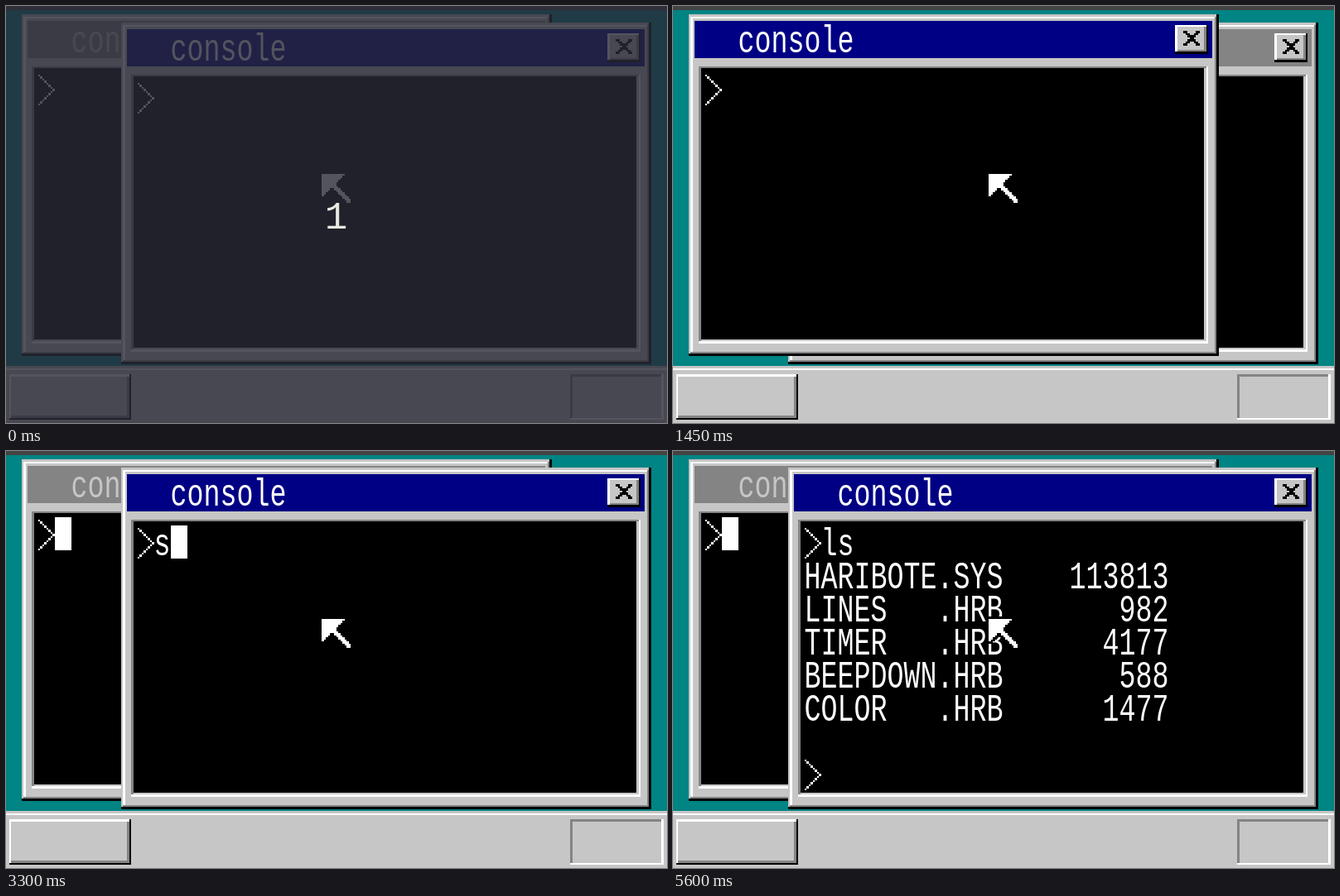
An HTML page for the animation above (5700 ms loop, 798 px wide and 504 px high).

```html
<!DOCTYPE html>
<html lang="en">
<head>
<meta charset="utf-8">
<title>Two consoles</title>
<style>
  html, body { margin: 0; width: 100%; height: 100%; overflow: hidden; background: #444; }
  svg { display: block; width: 798px; height: 504px; }
  rect, path { shape-rendering: crispEdges; }
  text { font-family: "Liberation Mono", "DejaVu Sans Mono", monospace; white-space: pre; }
</style>
</head>
<body>
<svg id="stage" viewBox="0 0 798 504"></svg>
<script>
const LOOP = 5700;
const GREY = '#c6c6c6', DARK = '#848484', WHITE = '#fff', BLACK = '#000';
const TEAL = '#008484', NAVY = '#000084';
const stage = document.getElementById('stage');

const LISTING = [
  ['HARIBOTE.SYS', 113813],
  ['LINES   .HRB', 982],
  ['TIMER   .HRB', 4177],
  ['BEEPDOWN.HRB', 588],
  ['COLOR   .HRB', 1477]
].map(([name, size]) => name + String(size).padStart(10));

// Corners are inclusive, in pixels of the 320 x 200 screen.
const box = (c, x0, y0, x1, y1) =>
  `<rect x="${x0}" y="${y0}" width="${x1 - x0 + 1}" height="${y1 - y0 + 1}" fill="${c}"/>`;

const at = (x, y, body) => `<g transform="translate(${x} ${y})">${body}</g>`;

// Tall 8 x 16 character cells.
const label = (x, y, str, c = WHITE) =>
  `<text transform="translate(${x} ${y + 14.2}) scale(1 1.4)" font-size="13.333" fill="${c}">${str}</text>`;

function prompt(y) {
  let out = '';
  for (let r = 1; r < 16; r++) {
    const x = 7 - Math.abs(r - 8);
    out += box(WHITE, x, y + r, x, y + r);
  }
  return out;
}

const block = (col, row) => box(WHITE, col * 8, row * 16, col * 8 + 7, row * 16 + 15);

function closeButton() {
  let out = box(BLACK, 0, 0, 15, 13) + box(WHITE, 0, 0, 14, 12) +
    box(DARK, 1, 1, 14, 12) + box(WHITE, 1, 0, 14, 0) + box(GREY, 1, 1, 13, 11);
  for (let r = 3; r < 10; r++) {
    const d = Math.abs(r - 6);
    out += box(BLACK, 7 - d, r, 8 - d, r) + box(BLACK, 7 + d, r, 8 + d, r);
  }
  return out;
}

function win(x, y, active, content) {
  return at(x, y,
    box(BLACK, 0, 0, 255, 164) + box(GREY, 0, 0, 254, 163) +
    box(DARK, 1, 1, 254, 163) + box(WHITE, 1, 1, 253, 162) +
    box(GREY, 2, 2, 253, 162) +
    box(active ? NAVY : DARK, 3, 3, 252, 20) +
    label(24, 4, 'console', active ? WHITE : GREY) +
    at(235, 5, closeButton()) +
    box(WHITE, 5, 25, 250, 158) + box(DARK, 5, 25, 249, 157) +
    box(GREY, 6, 26, 249, 157) + box(BLACK, 6, 26, 248, 156) +
    at(8, 28, content));
}

function desktop() {
  return box(TEAL, 0, 0, 319, 171) + box(GREY, 0, 172, 319, 199) +
    box(WHITE, 0, 173, 319, 173) +
    box(BLACK, 2, 176, 60, 197) + box(WHITE, 2, 176, 59, 196) +
    box(DARK, 3, 177, 59, 196) + box(GREY, 3, 177, 58, 195) +
    box(WHITE, 273, 176, 317, 197) + box(DARK, 273, 176, 316, 196) +
    box(GREY, 274, 177, 316, 196);
}

const pointer = at(152, 78,
  `<path fill="${WHITE}" stroke="${BLACK}" stroke-width="2" paint-order="stroke"
    d="M1 1H12V2H11V3H10V4H9V5H8V7H9V8H10V9H11V10H12V11H13V12H14V13H15V15H13V14H12V13H11V12H10V11H9V10H8V9H7V8H5V9H4V10H3V11H2V12H1Z"/>`);

function veil() {
  return `<rect width="798" height="504" fill="#282a36" fill-opacity=".8"/>
    <text x="398.5" y="269" font-size="46" text-anchor="middle" fill="#e8e8e0">1</text>`;
}

const within = (t, ...spans) => spans.some(([a, b]) => t >= a && t < b);

function stateAt(t) {
  return {
    dim: t < 200,
    leftOnTop: within(t, [1450, 2150]),
    leftCursor: t >= 2050,
    rightCursor: within(t, [200, 500], [1000, 1450], [3300, 3600],
      [3950, 4550], [5050, 5600]),
    typed: within(t, [2750, 3500]) ? 's' : t < 3850 ? '' : t < 4050 ? 'l' : 'ls',
    listed: t >= 4200
  };
}

function draw(s) {
  let right = prompt(0) + label(8, 0, s.typed);
  if (s.listed) {
    right += LISTING.map((line, i) => label(0, 16 * (i + 1), line)).join('') + prompt(112);
  }
  if (s.rightCursor) right += s.listed ? block(1, 7) : block(1 + s.typed.length, 0);
  const left = prompt(0) + (s.leftCursor ? block(1, 0) : '');

  const wins = [win(8, 2, s.leftOnTop, left), win(56, 6, !s.leftOnTop, right)];
  if (s.leftOnTop) wins.reverse();

  stage.innerHTML = '<rect width="798" height="504" fill="#444"/>' +
    `<g transform="translate(-1.5 5) scale(2.5)">${desktop()}${wins.join('')}${pointer}</g>` +
    (s.dim ? veil() : '');
}

let shown = '';
const start = performance.now();
function tick() {
  const state = stateAt((performance.now() - start) % LOOP);
  const key = JSON.stringify(state);
  if (key !== shown) {
    draw(state);
    shown = key;
  }
  requestAnimationFrame(tick);
}
tick();
</script>
</body>
</html>
```
